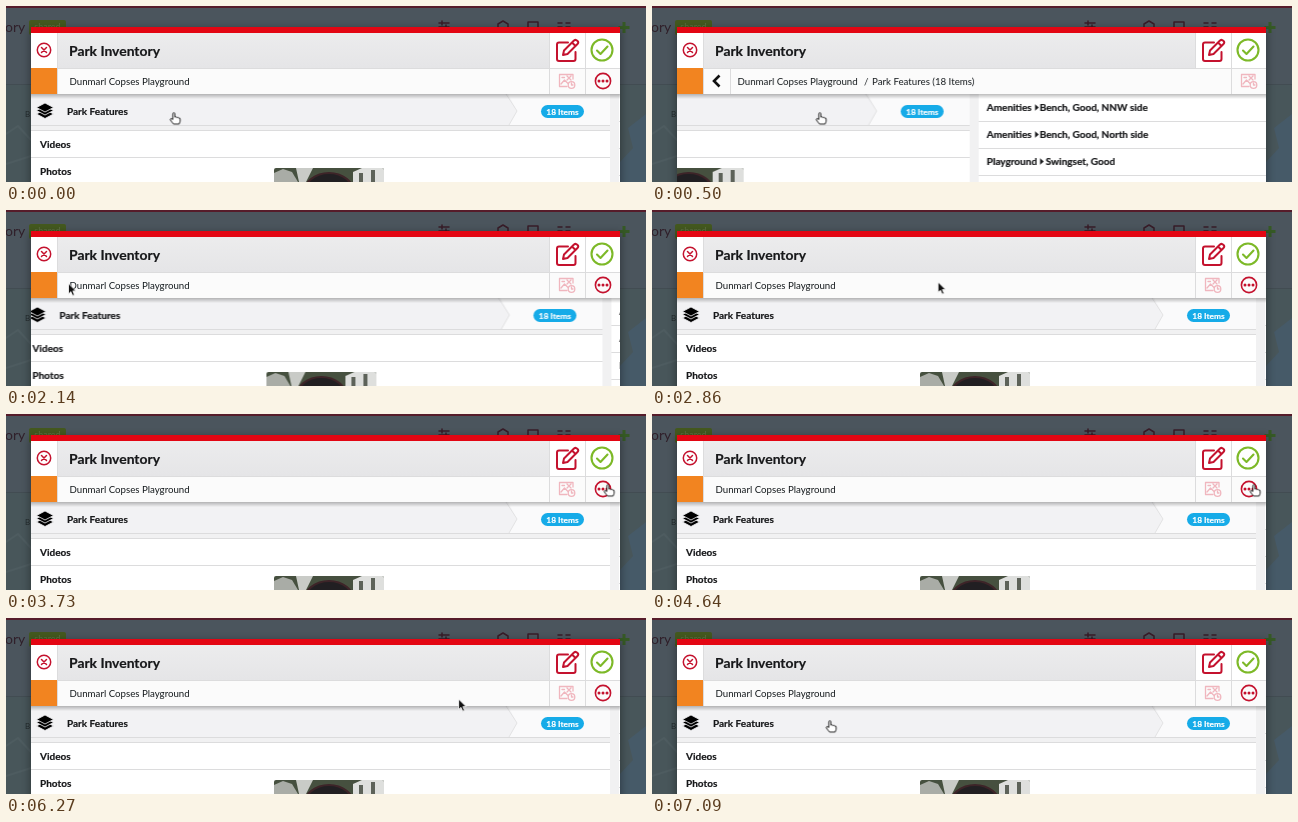
An HTML page that plays this animation: 640 px wide and 176 px high, repeating every 7.13 s.

```html
<!DOCTYPE html>
<html lang="en">
<head>
<meta charset="utf-8">
<title>Park Inventory</title>
<style>
  html, body { margin: 0; width: 100%; height: 100%; overflow: hidden; background: #48565a; }
  svg { display: block; width: 640px; height: 176px; font: 10px Lato, sans-serif; }
  .bold { font-weight: 700; fill: #17181a; stroke: #17181a; stroke-width: .2; }
  .crumb { font-size: 9.7px; fill: #14191c; }
  .line { fill: none; stroke-linecap: round; stroke-linejoin: round; }
  .rule { stroke: #dcdcdd; }
  .red { stroke: #c4122e; }

  .slide, .path, .link, .home, .deep, .tool, .cursor, .hand, .arrow {
    animation: 7130ms ease-in-out infinite;
  }
  .slide { animation-name: slide; }
  .path { animation-name: path; animation-timing-function: linear; }
  .link { animation-name: link; }
  .home { animation-name: home; }
  .deep { animation-name: deep; }
  .tool { animation-name: tool; animation-timing-function: step-end; }
  .cursor { animation-name: cursor; }
  .hand { animation-name: hand; animation-timing-function: step-end; }
  .arrow { animation-name: arrow; animation-timing-function: step-end; }

  @keyframes slide {
    0%, 3.23% { transform: translateX(0); }
    10.94%, 23% { transform: translateX(-588px); }
    30.65%, 100% { transform: translateX(0); }
  }
  @keyframes path {
    0%, 3.21% { transform: translateX(0); }
    7.01% { transform: translateX(22px); }
    10.92%, 23% { transform: translateX(27px); }
    28%, 100% { transform: translateX(0); }
  }
  @keyframes link {
    0%, 7.6% { fill: #14191c; }
    10.92%, 23% { fill: #16aee0; }
    30.7%, 100% { fill: #14191c; }
  }
  @keyframes home {
    0%, 3.21% { opacity: 1; }
    4.2%, 23% { opacity: 0; }
    24.5%, 100% { opacity: 1; }
  }
  @keyframes deep {
    0%, 3.21% { opacity: 0; }
    4.8%, 23% { opacity: 1; }
    24.5%, 100% { opacity: 0; }
  }
  @keyframes tool {
    0% { transform: none; }
    3.8% { transform: translateX(36px); }
    23.5%, 100% { transform: none; }
  }
  @keyframes cursor {
    0%, 11.2% { transform: translate(167px, 107px); }
    19.6%, 31.6% { transform: translate(64px, 74.5px); }
    50.5%, 80% { transform: translate(601px, 71px); }
    99.44% { transform: translate(177px, 103px); }
    100% { transform: translate(167px, 107px); }
  }
  @keyframes hand {
    0% { opacity: 1; }
    24% { opacity: 0; }
    47.5% { opacity: 1; }
    83% { opacity: 0; }
    91.6%, 100% { opacity: 1; }
  }
  @keyframes arrow {
    0% { opacity: 0; }
    24% { opacity: 1; }
    47.5% { opacity: 0; }
    83% { opacity: 1; }
    91.6%, 100% { opacity: 0; }
  }
</style>
</head>
<body>
<svg viewBox="0 0 640 176">
  <defs>
    <clipPath id="body"><rect x="25" y="88" width="589" height="88"/></clipPath>
    <clipPath id="frame"><rect x="268" y="162" width="110" height="20" rx="2"/></clipPath>
    <linearGradient id="bar" x2="0" y2="1">
      <stop stop-color="#ececed"/><stop offset="1" stop-color="#e5e5e7"/>
    </linearGradient>
    <linearGradient id="shade" x2="0" y2="1">
      <stop stop-color="#000" stop-opacity=".26"/><stop offset="1" stop-color="#000" stop-opacity="0"/>
    </linearGradient>
    <filter id="blur" x="-10%" y="-20%" width="120%" height="140%"><feGaussianBlur stdDeviation="4"/></filter>
  </defs>

  <!-- dimmed page -->
  <rect width="640" height="176" fill="#48565a"/>
  <rect width="640" height="78" fill="#4b555d"/>
  <rect width="640" height="2" fill="#561c2a"/>
  <path d="M0 78.500H640" stroke="#424c52"/>
  <path d="M640 108L622 122L627 142L614 156V176H640Z" fill="#465a68"/>
  <path d="M0 128L12 120L25 134M0 158L25 150" class="line" stroke="#4e5c60" stroke-width="2"/>
  <text x="-1" y="26" font-size="14" fill="#30202a">ory</text>
  <rect x="23" y="14" width="37" height="15" rx="2" fill="#44591f"/>
  <text x="41.500" y="24" font-size="9" fill="#5f7044" text-anchor="middle">shared</text>
  <g class="line" stroke="#381c28" stroke-width="1.500">
    <path d="M433 17H443M433 21H443M436 15V19M440 19V23"/>
    <path d="M492 18L497 15L502 18V24H492ZM522 16H532V24H522ZM552 17H556M560 17H564M552 21H556M560 21H564"/>
  </g>
  <path d="M618 16V27M612.500 21.500H623.500" stroke="#365a25" stroke-width="3"/>
  <text x="19" y="111" font-size="8" fill="#252c2e">B</text>
  <rect x="24" y="23" width="591" height="170" fill="#000" opacity=".35" filter="url(#blur)"/>

  <!-- dialog -->
  <rect x="25" y="21" width="589" height="155" fill="#fff"/>
  <g clip-path="url(#body)">
    <g class="slide">
      <g>
        <rect x="25" y="88" width="579" height="31" fill="#fafafb"/>
        <path d="M25 88H502L511 105L503 119H25Z" fill="#f2f2f4"/>
        <path d="M500 88L511 105L503 119" class="line" stroke="#e3e3e4"/>
        <rect x="25" y="119" width="579" height="6" fill="#f1f1f2"/>
        <path d="M25 119.500H604M25 124.500H604M25 151.500H604" class="rule"/>
        <rect x="604" y="88" width="9" height="88" fill="#f1f1f2"/>
        <g stroke="#f2f2f4" stroke-width=".8">
          <path d="M39 103.500L47.500 108L39 112.500L30.500 108Z"/>
          <path d="M39 100L47.500 104.500L39 109L30.500 104.500Z"/>
          <path d="M39 97L47.500 101.500L39 106L30.500 101.500Z"/>
        </g>
        <g class="bold">
          <text x="61" y="109">Park Features</text>
          <text x="34" y="142">Videos</text>
          <text x="34" y="169">Photos</text>
        </g>
        <rect x="535" y="99" width="43" height="13" rx="6.500" fill="#16abe8"/>
        <text x="556.500" y="108.500" font-weight="700" font-size="8.400" fill="#fff" stroke="#fff" stroke-width=".2" text-anchor="middle">18 Items</text>
        <g clip-path="url(#frame)">
          <rect x="268" y="162" width="110" height="14" fill="#46503f"/>
          <path d="M268 167L277 163L286 166L292 176H268Z" fill="#a9aca6"/>
          <path d="M290 162H307L300 176H293Z" fill="#c9cbc7"/>
          <path d="M347 166L356 162H378V176H347Z" fill="#dedfdd"/>
          <path d="M353 167H357V176H353ZM365 164H369V176H365Z" fill="#5d6259"/>
          <ellipse cx="323" cy="187" rx="25" ry="20" fill="#211f22" stroke="#3d2428" stroke-width="2"/>
        </g>
      </g>
      <g transform="translate(588)">
        <path d="M25 115.500H604M25 142.500H604M25 169.500H604" class="rule"/>
        <rect x="604" y="88" width="9" height="88" fill="#f5f5f5"/>
        <rect x="605" y="90" width="6.500" height="100" rx="3.200" fill="#b4b4b5"/>
        <g class="bold">
          <text x="33" y="105">Amenities</text>
          <text x="86" y="105">Bench, Good, NNW side</text>
          <text x="33" y="132">Amenities</text>
          <text x="86" y="132">Bench, Good, North side</text>
          <text x="33" y="159">Playground</text>
          <text x="92" y="159">Swingset, Good</text>
          <path d="M81.500 98.500L85 101.500L81.500 104.500ZM81.500 125.500L85 128.500L81.500 131.500ZM86.500 152.500L90 155.500L86.500 158.500Z"/>
          <g font-size="9.300">
            <text x="555" y="105">View</text>
            <text x="555" y="132">View</text>
            <text x="555" y="159">View</text>
          </g>
        </g>
        <path d="M587 97L591.500 101.500L587 106M587 124L591.500 128.500L587 133M587 151L591.500 155.500L587 160" fill="none" stroke="#111" stroke-width="2.500"/>
      </g>
    </g>
    <rect x="25" y="88" width="589" height="5" fill="url(#shade)"/>
  </g>

  <!-- title bar -->
  <rect x="25" y="21" width="589" height="6" fill="#e30613"/>
  <rect x="25" y="27" width="589" height="61" fill="#fff"/>
  <rect x="51" y="27" width="493" height="35" fill="url(#bar)"/>
  <rect x="51" y="62" width="563" height="26" fill="#fbfbfb"/>
  <rect x="25" y="62" width="26" height="26" fill="#f28420"/>
  <path d="M51 62.500H614M51.500 27V88M543.500 27V62M579.500 27V88" class="rule"/>
  <text x="63" y="50" class="bold" font-size="13.900">Park Inventory</text>
  <g class="line red" stroke-width="1.500">
    <circle cx="38" cy="44" r="6.700"/>
    <path d="M35.500 41.500L40.500 46.500M40.500 41.500L35.500 46.500"/>
  </g>
  <g class="line red" stroke-width="2">
    <path d="M562 36.500H553Q551 36.500 551 38.500V53Q551 55 553 55H567.500Q569.500 55 569.500 53V46"/>
    <path d="M557 49L558 44.500L568 34.500Q570 33 571.500 35Q573 36.500 571.500 38L561.500 48ZM566 36.500L569.500 40"/>
  </g>
  <g class="line" stroke="#7db928" stroke-width="2.100">
    <circle cx="596" cy="44" r="10.500"/>
    <path d="M591 44.500L594.500 48L601.500 40.500"/>
  </g>

  <!-- breadcrumb -->
  <g class="path crumb">
    <text x="63.500" y="79" class="link">Dunmarl Copses Playground</text>
    <g class="deep">
      <text x="190" y="79">/</text>
      <text x="198" y="79">Park Features (18 Items)</text>
    </g>
  </g>
  <g class="deep">
    <path d="M78.500 62V88" class="rule"/>
    <path d="M67.500 69.500L62 75L67.500 80.500" fill="none" stroke="#111" stroke-width="2.600"/>
  </g>
  <g class="tool line" stroke="#f0b6be" stroke-width="1.300">
    <path d="M561 80.500H553.500V68.500H567V73M555 78L558.500 74L562 77.500M556 71.500H558.500M561 70L565 74M565 70L561 74"/>
    <circle cx="565.500" cy="79" r="3.300"/>
    <path d="M565.500 77V79H567"/>
  </g>
  <g class="home">
    <path d="M543.500 62V88" class="rule"/>
    <circle cx="597" cy="75" r="7.600" class="line red" stroke-width="1.600"/>
    <g fill="#c4122e">
      <circle cx="593" cy="75" r="1.500"/><circle cx="597" cy="75" r="1.500"/><circle cx="601" cy="75" r="1.500"/>
    </g>
  </g>

  <!-- pointer -->
  <g class="cursor">
    <g transform="translate(1) scale(.92)">
      <path class="hand" d="M-1.300 7V1Q-1.300 -.3 -.2 -.3Q1 -.3 1 1V4.500Q2.200 3.700 3 4.900Q4.300 4.300 5 5.400Q6.700 5 6.700 6.700V9L5.500 12H-.5L-4 7.600Q-4.300 6.200 -3 6Z" fill="#fff" stroke="#111" stroke-linejoin="round"/>
    </g>
    <path class="arrow" d="M-1.500 -1V9.500L.9 7.300L2.700 11.200L4.500 10.300L2.800 6.600H6.100Z" fill="#111" stroke="#fff" stroke-width=".8"/>
  </g>
</svg>
</body>
</html>
```
